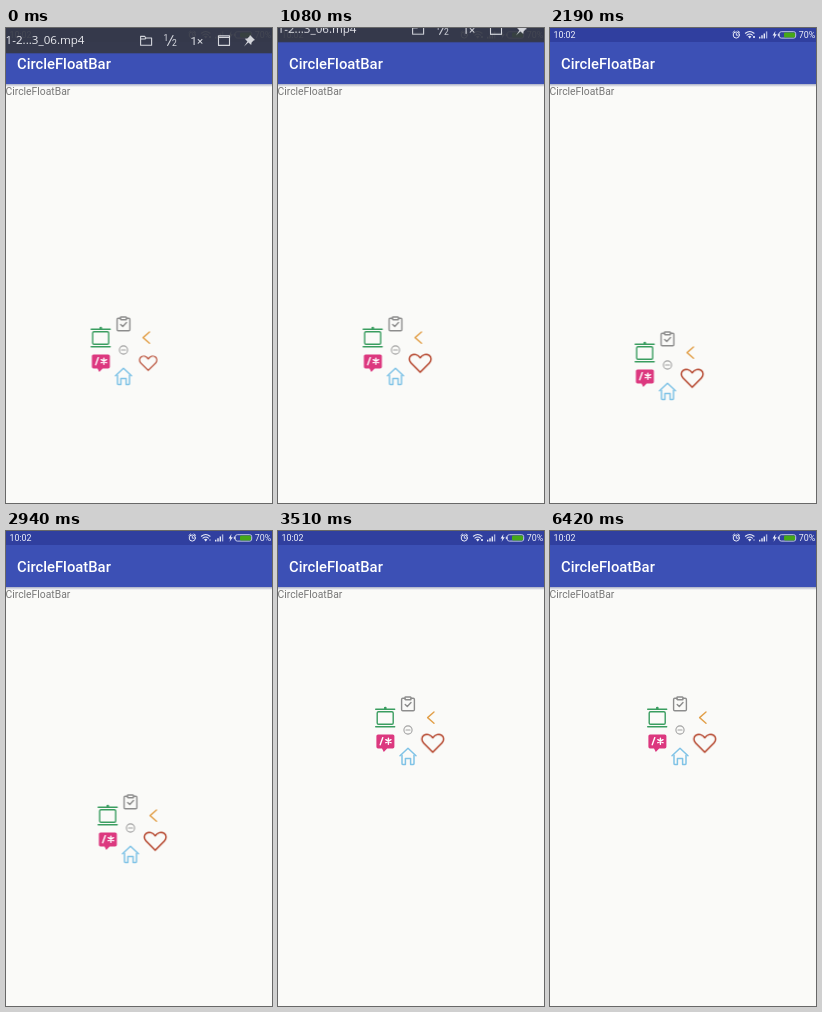
Recreate the animation shown at these times as an HTML page. Size 266x475 px, loop 8000 ms.

```html
<!DOCTYPE html>
<html lang="en">
<head>
<meta charset="utf-8">
<title>CircleFloatBar</title>
<style>
  html, body { margin: 0; width: 100%; height: 100%; overflow: hidden; background: #fafaf8; }
  svg { display: block; width: 266px; height: 475px; }
  text { font-family: Roboto, "Open Sans", sans-serif; }
  .line { fill: none; stroke-width: 1.4; stroke-linecap: round; stroke-linejoin: round; }
  .small { font-size: 8.87px; fill: #eef0fa; }

  #menu, #heart, #player, #blip { animation: 8s linear infinite; }
  #menu { animation-name: drag; }
  #heart { animation-name: grow; }
  #player { animation-name: leave; }
  #blip { animation-name: blip; animation-timing-function: step-end; }

  /* steps() keeps the 30 ms cadence */
  @keyframes drag {
    0% { transform: translate(0, 0); animation-timing-function: step-end; }
    27.375% { transform: translate(0, 15px); animation-timing-function: step-end; }
    34.125% { transform: translate(0, 15px); animation-timing-function: steps(3); }
    35.25% { transform: translate(3px, 4px); animation-timing-function: steps(4); }
    36.75% { transform: translate(7px, -25px); animation-timing-function: steps(5); }
    38.625% { transform: translate(11px, -70.5px); animation-timing-function: steps(6); }
    40.875%, 100% { transform: translate(12.5px, -123px); }
  }
  @keyframes grow {
    0% { transform: scale(.8); }
    1.125% { transform: scale(.8); animation-timing-function: steps(11); }
    5.25%, 100% { transform: scale(1); }
  }
  @keyframes leave {
    0% { transform: translateY(0); }
    12.375% { transform: translateY(0); animation-timing-function: steps(7); }
    15%, 100% { transform: translateY(-26px); }
  }
  @keyframes blip {
    0%, 43.875%, 67.875% { opacity: 1; }
    31.875%, 55.875%, 80.25% { opacity: .35; }
  }
</style>
</head>
<body>
<svg viewBox="0 0 266 475">
  <defs>
    <linearGradient id="shade" x2="0" y2="1">
      <stop offset="0" stop-color="#8f96b4" stop-opacity=".75"/>
      <stop offset="1" stop-color="#8f96b4" stop-opacity="0"/>
    </linearGradient>
  </defs>

  <rect width="266" height="475" fill="#fafaf8"/>
  <text x="-.5" y="67" font-size="10.35" fill="#777">CircleFloatBar</text>

  <!-- app bar -->
  <rect y="56" width="266" height="3" fill="url(#shade)"/>
  <rect width="266" height="56" fill="#3c50b5"/>
  <rect width="266" height="14" fill="#303f9f"/>
  <text x="11" y="41" font-size="14.8" font-weight="500" fill="#fff">CircleFloatBar</text>

  <!-- status bar -->
  <text class="small" x="3.5" y="10.2">10:02</text>
  <g fill="none" stroke="#e8ebf8" stroke-linecap="round">
    <circle cx="186.3" cy="7" r="3.1"/>
    <path d="M186.3 5.2V7.2H187.6M182.9 4.4L184.6 3M189.7 4.4L188 3" stroke-width=".9"/>
    <path d="M195.4 5.2Q199.7 1.8 204 5.2M197 7.1Q199.7 5 202.4 7.1" stroke-width="1.1"/>
  </g>
  <path d="M198 8.4Q199.7 7.2 201.4 8.4L199.7 10.4Z" fill="#e8ebf8"/>
  <rect id="blip" x="203" y="8" width="2" height="2" fill="#c9cfee"/>
  <path d="M209 10.4V8.8h1.4v1.6zM211.3 10.4V7.2h1.4v3.2zM213.6 10.4V5.4h1.4v5z" fill="#e8ebf8"/>
  <path d="M215.9 10.4V3.4h1.4v7z" fill="#a9b2e0"/>
  <path d="M225.4 3L222.6 7.4H224.4L223.6 10.8L226.8 6.2H225Z" fill="#e8ebf8"/>
  <rect x="229.3" y="3.7" width="16.4" height="6.4" rx="2" fill="#303f9f" stroke="#d5daf0" stroke-width=".9"/>
  <rect x="234" y="4.4" width="11" height="5" rx="1.2" fill="#46a818"/>
  <rect x="227.8" y="5.6" width="1.2" height="2.6" fill="#d5daf0"/>
  <text class="small" x="248.7" y="10.2">70%</text>

  <!-- floating menu -->
  <g id="menu">
    <g transform="translate(117.5 322)">
      <g class="line" stroke="#a2a2a2" style="stroke-width:1.1">
        <circle r="4.1"/>
        <path d="M-2 0H2"/>
      </g>

      <g class="line" stroke="#8d8d8d">
        <path d="M-3-31.7H-5.2Q-6.4-31.7-6.4-30.5V-20.4Q-6.4-19.2-5.2-19.2H5.2Q6.4-19.2 6.4-20.4V-30.5Q6.4-31.7 5.2-31.7H3"/>
        <rect x="-3" y="-33" width="6" height="2.8" rx=".6"/>
        <path d="M-2.8-25.6L-.7-23.4L3-27.4"/>
      </g>

      <path class="line" stroke="#e2a04a" d="M26-18L19.6-12.4L26-6.8"/>

      <g class="line" stroke="#3a9d60">
        <path d="M-32.3-20.8H-13.3M-32.3-3.3H-13.3"/>
        <rect x="-30.8" y="-18.3" width="16" height="12.6" rx="1.3"/>
        <circle cx="-22.7" cy="-21.8" r=".7"/>
      </g>

      <path fill="#dc387f" d="M-30 4.4H-15.2Q-13.6 4.4-13.6 6V16.8Q-13.6 18.4-15.2 18.4H-20.8L-24.2 22L-26 18.4H-30Q-31.6 18.4-31.6 16.8V6Q-31.6 4.4-30 4.4Z"/>
      <path class="line" stroke="#fff" d="M-25.2 7.6L-27.8 14.8M-19.6 8.2V14.2M-22.2 9.7L-17 12.7M-22.2 12.7L-17 9.7"/>

      <g class="line" stroke="#80c3e6" style="stroke-width:1.5">
        <path d="M-8 25.8L0 18.2L8 25.8"/>
        <path d="M-6 25.2V33.4Q-6 34.6-4.8 34.6H-2.6V28.6H2.6V34.6H4.8Q6 34.6 6 33.4V25.2"/>
      </g>

      <g transform="translate(24.7 13.2)">
        <path id="heart" class="line" stroke="#b0391f" d="M0 9L-9.2-.2C-11.5-2.6-11.4-6.2-9-7.9C-6.3-9.7-2.4-8.8 0-5.4C2.4-8.8 6.3-9.7 9-7.9C11.4-6.2 11.5-2.6 9.2-.2Z"/>
      </g>
    </g>
  </g>

  <!-- player title strip -->
  <g id="player">
    <rect width="266" height="25.3" fill="#363a45" fill-opacity=".93"/>
    <text x="78.5" y="16.2" font-size="11.6" text-anchor="end" fill="#e9eaee" style="font-family:'Open Sans',sans-serif">1-2...3_06.mp4</text>
    <g class="line" stroke="#d3d5db" style="stroke-width:1.1">
      <path d="M134.6 17.2V8.4H138.6L140 10H145.6V17.2ZM134.6 11H139L140 10"/>
      <path d="M167 7.6L161.6 17.4"/>
      <path d="M212.5 7.8H223.5V17.4H212.5ZM212.5 9.4H223.5"/>
    </g>
    <g fill="#dddfe4" style="font-family:'Open Sans',sans-serif">
      <text x="157.6" y="13" font-size="8.5">1</text>
      <text x="166" y="18" font-size="8.5">2</text>
      <text x="184.6" y="16.6" font-size="11.6">1×</text>
    </g>
    <path d="M244 7L249 12L247.6 12.6L245.6 14.6L245.2 17L242.4 14.4L238 18.4L241.4 13.4L238.8 10.8L241.4 10.4L243.4 8.4Z" fill="#d3d5db"/>
  </g>
</svg>
</body>
</html>
```
